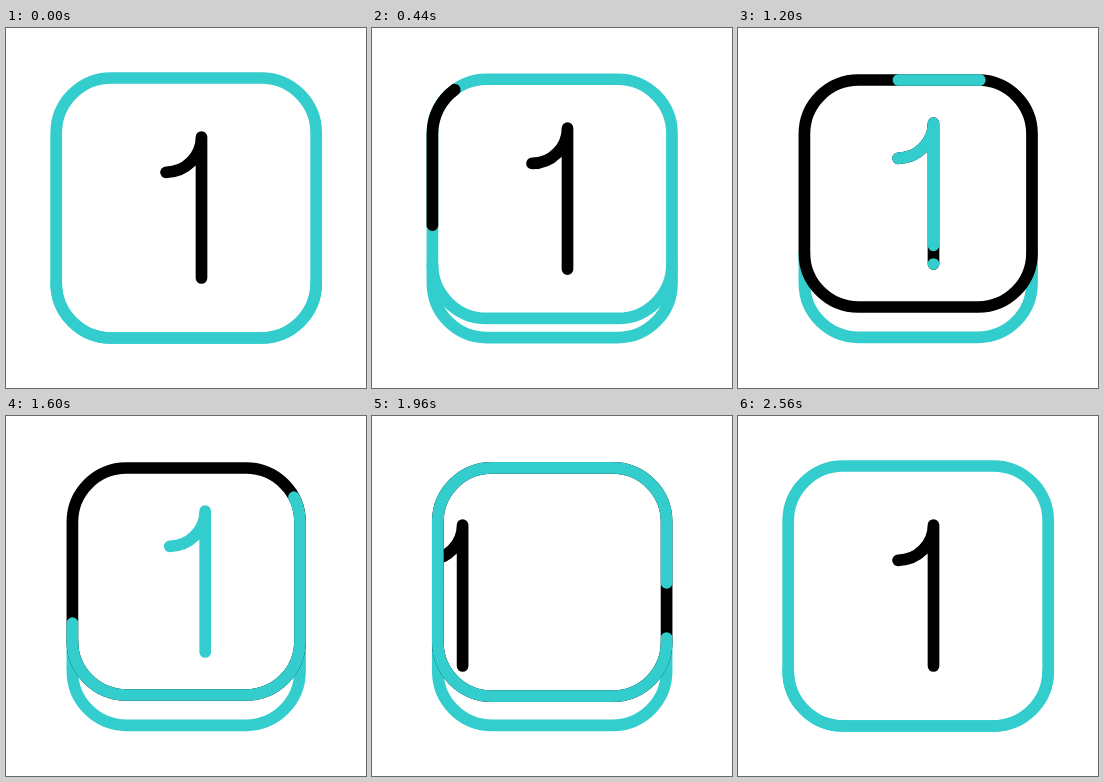
Recreate the animation shown at these times as an HTML page. Size 360 px wide and 360 px high, loop 2800 ms.

```html
<!DOCTYPE html>
<html lang="en">
<head>
<meta charset="utf-8">
<title>Key one</title>
<style>
  html, body { margin: 0; width: 100%; height: 100%; overflow: hidden; background: #fff; }
  svg { display: block; width: 100%; height: 100%; }
  path { fill: none; stroke-width: 11.7; stroke-linecap: round; stroke-linejoin: round; }
  .teal { stroke: #32cdcc; }
  .black { stroke: #000; }
</style>
</head>
<body>
<svg viewBox="0 0 360 360">
  <defs><clipPath id="inside"><path id="mask"/></clipPath></defs>
  <g clip-path="url(#inside)">
    <g id="oldDigit">
      <path id="digitBlack" class="black"/>
      <path id="digitTeal" class="teal" pathLength="1"/>
    </g>
    <path id="newDigit" class="black"/>
  </g>
  <path id="side" class="teal"/>
  <path id="faceBase" class="teal"/>
  <path id="faceBlack" class="black" pathLength="1"/>
  <path id="faceTeal" class="teal" pathLength="1"/>
</svg>
<script>
const LOOP = 2800, STEP = 40;
const DIGIT = 'M160 144.3A35.5 35.5 0 0 0 195.5 109V250';
const SLIDE = 260;
const el = id => document.getElementById(id);
const mix = (a, b, p) => a + (b - a) * p;
const span = (t, a, b) => Math.min(1, Math.max(0, (t - a) / (b - a)));
const smooth = u => u * u * (3 - 2 * u);

// Cubic bezier easing with handles (x1, 0) and (x2, 1).
function ease(u, x1, x2) {
  let lo = 0, hi = 1;
  for (let i = 0; i < 30; i++) {
    const s = (lo + hi) / 2, r = 1 - s;
    if (3 * r * r * s * x1 + 3 * r * s * s * x2 + s * s * s < u) lo = s;
    else hi = s;
  }
  return smooth((lo + hi) / 2);
}

const show = (node, on) => node.setAttribute('visibility', on ? 'visible' : 'hidden');
const move = (node, x, y) => node.setAttribute('transform', `translate(${x} ${y})`);

function trim(node, start, len) {
  show(node, len > 0);
  if (len >= 1) {
    node.removeAttribute('stroke-dasharray');
    return;
  }
  node.setAttribute('stroke-dasharray', `${len} ${1 - len}`);
  node.setAttribute('stroke-dashoffset', -start);
}

// Rounded box, clockwise from the top of its left side.
function box(l, t, r, b, c) {
  const arc = (x, y) => `A${c} ${c} 0 0 1 ${x} ${y}`;
  return `M${l} ${t + c}${arc(l + c, t)}H${r - c}${arc(r, t + c)}V${b - c}` +
    `${arc(r - c, b)}H${l + c}${arc(l, b - c)}Z`;
}

function draw(t) {
  const press = smooth(span(t, 40, 720)) - ease(span(t, 1920, 2560), 0.2, 0.2);
  const left = mix(50.2, 66.4, press), right = 360.4 - left;
  const top = mix(50, 52, press), bottom = mix(310, 279, press);
  const floor = mix(310, 309.3, press), c = mix(55, 54, press);

  const face = box(left, top, right, bottom, c);
  for (const id of ['mask', 'faceBase', 'faceBlack', 'faceTeal']) el(id).setAttribute('d', face);
  el('side').setAttribute('d',
    `M${left} ${bottom - c}V${floor - c}A${c} ${c} 0 0 0 ${left + c} ${floor}` +
    `H${right - c}A${c} ${c} 0 0 0 ${right} ${floor - c}V${bottom - c}`);

  // Both strokes share one slowly turning start point.
  const start = -0.106 + 0.000309 * (t - 440) + 7.2e-8 * (t - 440) * (t - 760);
  const dark = smooth(span(t, 249, 990));
  const light = smooth(span(t, 970, 2146));
  show(el('faceBase'), dark < 1);
  trim(el('faceBlack'), start, light < 1 ? dark : 0);
  trim(el('faceTeal'), start, light);

  const tint = smooth(span(t, 520, 1360));
  const slide = SLIDE * ease(span(t, 1540, 2435), 0.33, 0.44);
  show(el('digitBlack'), tint < 1);
  trim(el('digitTeal'), 0, tint);
  move(el('oldDigit'), slide, -14 * smooth(span(t, 40, 720)));
  move(el('newDigit'), slide - SLIDE, 0);
}

for (const id of ['digitBlack', 'digitTeal', 'newDigit']) el(id).setAttribute('d', DIGIT);

const begin = performance.now();
function tick() {
  const t = (performance.now() - begin) % LOOP;
  draw(Math.floor(t / STEP) * STEP);
  requestAnimationFrame(tick);
}
tick();
</script>
</body>
</html>
```
